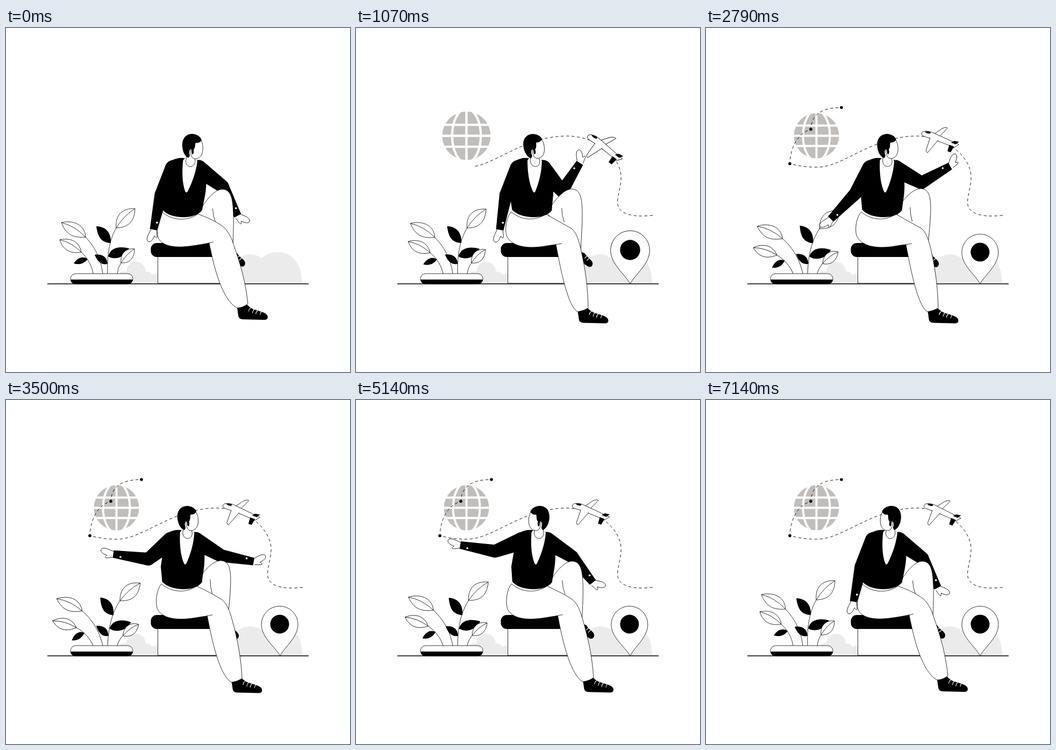
Recreate the animation shown at these times as an HTML page. Size 640x640 px, loop 7210 ms.

```html
<!DOCTYPE html>
<html lang="en">
<head>
<meta charset="utf-8">
<title>Planning a trip</title>
<style>
  html, body { margin: 0; width: 100%; height: 100%; overflow: hidden; background: #fff; }
  svg { display: block; width: 100vw; height: 100vh; }
  .line { fill: #fff; stroke: #000; stroke-width: .8; stroke-linejoin: round; }
  .open { fill: none; stroke: #000; stroke-width: .8; }
  .lace { fill: none; stroke: #fff; stroke-width: 1.1; stroke-linecap: round; }
  .bush { fill: #ebebeb; }
  .grid { fill: none; stroke: #fff; stroke-width: 4; }
</style>
</head>
<body>
<svg viewBox="0 0 640 640">
  <defs>
    <path id="route" d="M552 348.500C515 353 482 347 487 318C489 303 494 290 493 273C490 240 450 201 392 201C310 201 255 259 207 259C185 259 170 256 156 252.500C157 225 168 197 195 188.500C196 165 210 148 252 148"/>
    <path id="hand" class="line" d="M0 5C6 6 13 9 18 8.500C25 8 26 2 20 -1C17 -3 14 -3 11 -4C13 -6 15 -9 13 -9C9 -9 5 -7 0 -6"/>
    <clipPath id="sky"><path d="M0 0H640V475H0Z"/></clipPath>
    <mask id="drawn" maskUnits="userSpaceOnUse" x="0" y="0" width="640" height="640">
      <use id="reveal" href="#route" fill="none" stroke="#fff" stroke-width="8"/>
    </mask>
  </defs>

  <g class="bush" clip-path="url(#sky)">
    <circle cx="242" cy="453" r="18"/><circle cx="219" cy="463" r="10.500"/>
    <circle cx="262" cy="464" r="11"/><circle cx="279" cy="467" r="10"/>
    <path d="M208 475L212 464H283V475ZM425 475V455H549L551 475Z"/>
    <circle cx="454" cy="455" r="34"/><circle cx="505" cy="461" r="44"/>
  </g>

  <g id="globe">
    <circle r="42" fill="#c0bdbb"/>
    <g class="grid">
      <path d="M0 -44V44M-44 -19H44M-44 0H44M-44 19H44"/>
      <ellipse rx="25" ry="47"/>
    </g>
  </g>
  <use href="#route" fill="none" stroke="#000" stroke-width=".9" stroke-dasharray="5.500 4.500" mask="url(#drawn)"/>
  <circle class="stop" cx="156" cy="252.500"/>
  <circle class="stop" cx="195" cy="188.500"/>
  <circle class="stop" cx="252" cy="148"/>

  <path d="M77 476H563" stroke="#000" stroke-width="1.300"/>
  <g id="pin">
    <path class="line" d="M510 476C502 460 476 442 476 417.500A34 34 0 0 1 544 417.500C544 442 518 460 510 476Z"/>
    <circle cx="510" cy="417" r="17.500"/>
  </g>

  <g id="plane">
    <path class="line" d="M423 195L438 184Q446 180.500 448 183L430 203Z"/>
    <path class="line" d="M400 195C400 189 412 189 420 192L458 208L470 213L461 219C445 212 425 206 413 202C405 200 400 199 400 195Z"/>
    <path class="line" d="M416 202L409 226Q410 230 412 230L431 206"/>
    <path d="M406 191Q412 189 417 192L416 194Q410 195 406 191ZM455 210L461 206.500L470 208L464 213ZM452 214L449 226L455 228L461 217Z"/>
  </g>

  <!-- Each stem bends about its root, by data-bend degrees at full sway -->
  <g class="stem" data-root="180" data-bend="-5.500">
    <path class="open" d="M148 389C168 410 177 433 180 457"/>
    <path class="line" d="M103 362C124 357 147 365 148 389C122 391 111 382 103 362Q128 368 148 389"/>
  </g>
  <g class="stem" data-root="162" data-bend="-14">
    <path class="open" d="M140 417C152 428 160 443 162 457"/>
    <path class="line" d="M100 394C119 390 136 396 140 417C121 420 107 415 100 394Q122 399 140 417"/>
    <path d="M126 438C134 426 144 424 152 430C145 439 136 441 126 438Z"/>
  </g>
  <g class="stem" data-root="189" data-bend="4.750">
    <path class="open" d="M205 372C191 397 188 425 189 457"/>
    <path class="line" d="M240 336C216 335 203 348 205 372C229 371 239 359 240 336Q219 349 205 372"/>
    <path d="M168 369C184 369 196 379 195 400C177 399 171 389 168 369ZM229 410C210 405 194 409 190 425C202 432 220 428 229 410ZM165 422C178 420 188 425 189 439C178 441 171 436 165 422Z"/>
  </g>
  <g class="stem" data-root="207" data-bend="10.300">
    <path class="open" d="M214 437Q208 446 207 457"/>
    <path class="line" d="M239 411C224 409 212 419 214 437C230 438 239 428 239 411Q224 420 214 437"/>
  </g>
  <rect class="line" x="120" y="457" width="116" height="19" rx="9.500"/>
  <path d="M120 468H236Q235 476.500 226 476.500H130Q121 476.500 120 468Z"/>

  <rect class="line" x="282.500" y="420" width="121" height="55"/>
  <rect x="269.500" y="400" width="140" height="26" rx="11"/>

  <g id="rightArm"></g>
  <g id="backLeg">
    <path d="M422 416L430 419C434 427 444 430 445 437Q445 444 439 444C432 442 426 436 420 430Z"/>
    <path class="lace" d="M434 424L430 428M438 428L434 432"/>
    <path class="line" d="M364 334C375 317 388 301 402 300C419 300 422 318 423 345C424 370 422 395 422 418L400 418L360 348"/>
    <path class="open" d="M384.500 336Q385 350 390 362"/>
  </g>
  <g id="shoe">
    <path d="M430 520L448 514Q455 522 463 524C475 528 487 530 487 538Q487 543 480 543L440 542Q432 541 432 534Z"/>
    <path class="lace" d="M455 521Q452 523 451.500 527M462 523Q459 526 458.500 530M468 526Q465 528 465 532M475 528Q473 530 473 533"/>
  </g>
  <path id="pants" class="line"/>
  <g id="leftArm"></g>
  <g id="torso">
    <path d="M331 242C322 241 314 243 308 247L297 275L290 310L291 338C305 356 352 357 365 339C367 325 372 310 372.500 290L373 262L354 245Z"/>
    <path fill="#fff" d="M329.500 246C327 268 328 290 333.500 304Q335.500 308 338 304C347 286 354 266 356 247L350 241H334Z"/>
    <path class="line" d="M336 236L334.500 248C335 261 351 261 352 248L351 238"/>
  </g>
  <g id="head">
    <path class="line" d="M347 212L363 209C367 216 367 226 365 233C362 242 355 244 350 243C345 242 344 236 343 230Z"/>
    <path d="M338 241C331 237 327.500 226 328 216C329 202 338 197 346 197C355 197 363 203 364 209C361 213 357 214.500 353 213.500C351 218 353 222 349 226C350 231 349 235 346.500 235C344.500 232 346 228 344.500 225C341 226 340 231 342 237C341 240 340 242 338 241Z"/>
  </g>
</svg>
<script>
const LOOP = 7210, STEP = LOOP / 101, TAU = 2 * Math.PI;
const $ = id => document.getElementById(id);
const set = (el, attrs) => { for (const k in attrs) el.setAttribute(k, attrs[k]); return el; };
const move = (id, transform) => set($(id), { transform });
const add = (parent, tag, attrs) =>
  set(parent.appendChild(document.createElementNS('http://www.w3.org/2000/svg', tag)), attrs);

const mix = (a, b, p) => a + (b - a) * p;
const ease = p => p * p * (3 - 2 * p);
const span = (t, start, length) => Math.min(1, Math.max(0, (t - start) / length));
// Grows from 0 to 1 with a small overshoot
const pop = p => 1 + 2.4 * (p - 1) ** 3 + 1.4 * (p - 1) ** 2;
const wobble = p => Math.sin(Math.PI * p) * Math.sin(2 * TAU * p);

// Key poses: time, body lean, left arm angles, right arm angles, front leg, back leg
const rest = [0, 116, 102, 36, 62.5, 0, 0];
const poses = [
  [0, ...rest],
  [1070, -10.5, 116, 100, 49, -58, 1, .4],
  [2790, -6, 122, 134, 28, -30, 1, 1],
  [4210, -5.5, 160, 243, 32, 51, .2, 1],
  [5140, -3, 159, 190, 32, 51, .45, .15],
  [6210, -9.5, 116, 100, 31, 56, 0, 0],
  [7140, ...rest],
  [LOOP, ...rest]
];
function poseAt(t) {
  const i = poses.findIndex(pose => pose[0] > t), a = poses[i - 1], b = poses[i];
  const p = ease((t - a[0]) / (b[0] - a[0]));
  return a.map((v, k) => mix(v, b[k], p)).slice(1);
}

// Front leg stretched out and drawn in
const legOut = 'M290 342C281 352 279 375 283 390C290 405 310 408 330 407C345 406 362 403 378 400C386 440 395 475 410 500Q420 516 430 521Q442 520 450 513C447 480 437 440 425 408C420 390 413 377 403 369C388 358 373 352 357 346C340 359 310 360 290 342M377 400L386 398';
const legIn = 'M289 342C281 350 276 372 280 386C287 402 305 408 328 408C345 408 358 404 372 403C379 440 387 480 397 505Q404 523 412 528Q424 526 432 521C431 480 427 450 418 410C413 390 409 380 401 373C385 364 370 356 353 346C336 359 308 359 289 342M371 403L383 401';
function mixPath(a, b, p) {
  const ends = b.match(/\d+/g);
  let i = 0;
  return a.replace(/\d+/g, v => mix(+v, +ends[i++], p).toFixed(2));
}

function makeArm(id, upper, fore, side, bend) {
  return {
    upper, fore, side, bend,
    hand: add($(id), 'use', { href: '#hand' }),
    sleeve: add($(id), 'path', {}),
    button: add($(id), 'circle', { r: 1.8, fill: '#fff' })
  };
}
const leftArm = makeArm('leftArm', 54, 66, 1, 0);
const rightArm = makeArm('rightArm', 55, 62, -1, -25);

const disc = ([x, y], r) => `M${x - r} ${y}a${r} ${r} 0 0 0 ${2 * r} 0a${r} ${r} 0 0 0 ${-2 * r} 0Z`;
const polar = ([x, y], length, degrees, side = 0) => {
  const c = Math.cos(degrees * TAU / 360), s = Math.sin(degrees * TAU / 360);
  return [x + c * length - s * side, y + s * length + c * side];
};
const bone = (from, ra, length, rb, angle) =>
  `M${polar(from, 0, angle, ra)}L${polar(from, length, angle, rb)}L${polar(from, length, angle, -rb)}L${polar(from, 0, angle, -ra)}Z`;

function drawArm(arm, shoulder, upperAngle, foreAngle) {
  const elbow = polar(shoulder, arm.upper, upperAngle), wrist = polar(elbow, arm.fore, foreAngle);
  set(arm.sleeve, {
    d: disc(shoulder, 16.5) + bone(shoulder, 16.5, arm.upper, 12, upperAngle) +
       disc(elbow, 12) + bone(elbow, 12, arm.fore, 7, foreAngle)
  });
  const [cx, cy] = polar(wrist, -14, foreAngle, -3.5);
  set(arm.button, { cx, cy });
  set(arm.hand, { transform: `translate(${wrist}) rotate(${foreAngle + arm.bend}) scale(1 ${arm.side})` });
}

// The plane follows the route and parks above the traveller
const route = $('route'), routeLength = route.getTotalLength();
let parked = 300;
while (route.getPointAtLength(parked).x < 434) parked--;

function drawPlane(t) {
  const p = span(t, 500, 920);
  const drift = p < 1 ? 0 : 1 + Math.cos(TAU * (t - 4210) / 2930);
  const d = parked * (1 - (1 - p) ** 2) - 2.2 * drift;
  const a = route.getPointAtLength(d), b = route.getPointAtLength(d + 1);
  const heading = Math.atan2(a.y - b.y, a.x - b.x) * 360 / TAU;
  move('plane', `translate(${a.x} ${a.y - 3}) rotate(${heading - 19}) scale(${pop(span(t, 620, 700))}) translate(-434 -203)`);
}

function draw(t) {
  const sway = (1 - Math.cos(TAU * t / LOOP)) / 2;
  document.querySelectorAll('.stem').forEach(stem =>
    set(stem, { transform: `rotate(${stem.dataset.bend * sway} ${stem.dataset.root} 457)` }));

  const size = pop(span(t, 620, 700));
  const pulse = 1 + .1 * Math.sin(Math.PI * span(t, 3780, 1000)) ** 2;
  move('globe', `translate(205.5 200.5) scale(${size * pulse})`);
  const tilt = 3 * (wobble(span(t, 1550, 2480)) - wobble(span(t, 4660, 2480)));
  move('pin', `translate(510 476) rotate(${tilt}) scale(${size}) translate(-510 -476)`);
  drawPlane(t);

  set($('reveal'), {
    'stroke-dasharray': `${routeLength} ${routeLength}`,
    'stroke-dashoffset': routeLength * (1 - span(t, 200, 1300))
  });
  document.querySelectorAll('.stop').forEach((stop, i) =>
    set(stop, { r: 2.8 * ease(span(t, 1190 + 160 * i, 150)) }));

  const [lean, leftUpper, leftFore, rightUpper, rightFore, leg, knee] = poseAt(t);
  set($('pants'), { d: mixPath(legOut, legIn, leg) });
  move('shoe', `translate(${-17.5 * leg} ${6.5 * leg * leg})`);
  move('backLeg', `translate(${-2 * knee} ${-2 * knee}) rotate(${4 * knee} 390 300)`);

  move('torso', `matrix(1 0 ${-lean / 100} 1 ${3.45 * lean} 0)`);
  drawArm(leftArm, [312 + .9 * lean, 262], leftUpper, leftFore);
  drawArm(rightArm, [358 + lean, 262], rightUpper, rightFore);
  move('head', t < 3500
    ? `translate(${1.5 * lean} 0) rotate(${.7 * lean} 347 225)`
    : `translate(${343.5 + lean} 0) scale(-1 1) rotate(-3 0 225) translate(-347 0)`);
}

const start = performance.now();
function tick() {
  const t = (performance.now() - start) % LOOP;
  draw(Math.min(100, Math.floor((t + 4) / STEP)) * STEP);
  requestAnimationFrame(tick);
}
tick();
</script>
</body>
</html>
```
